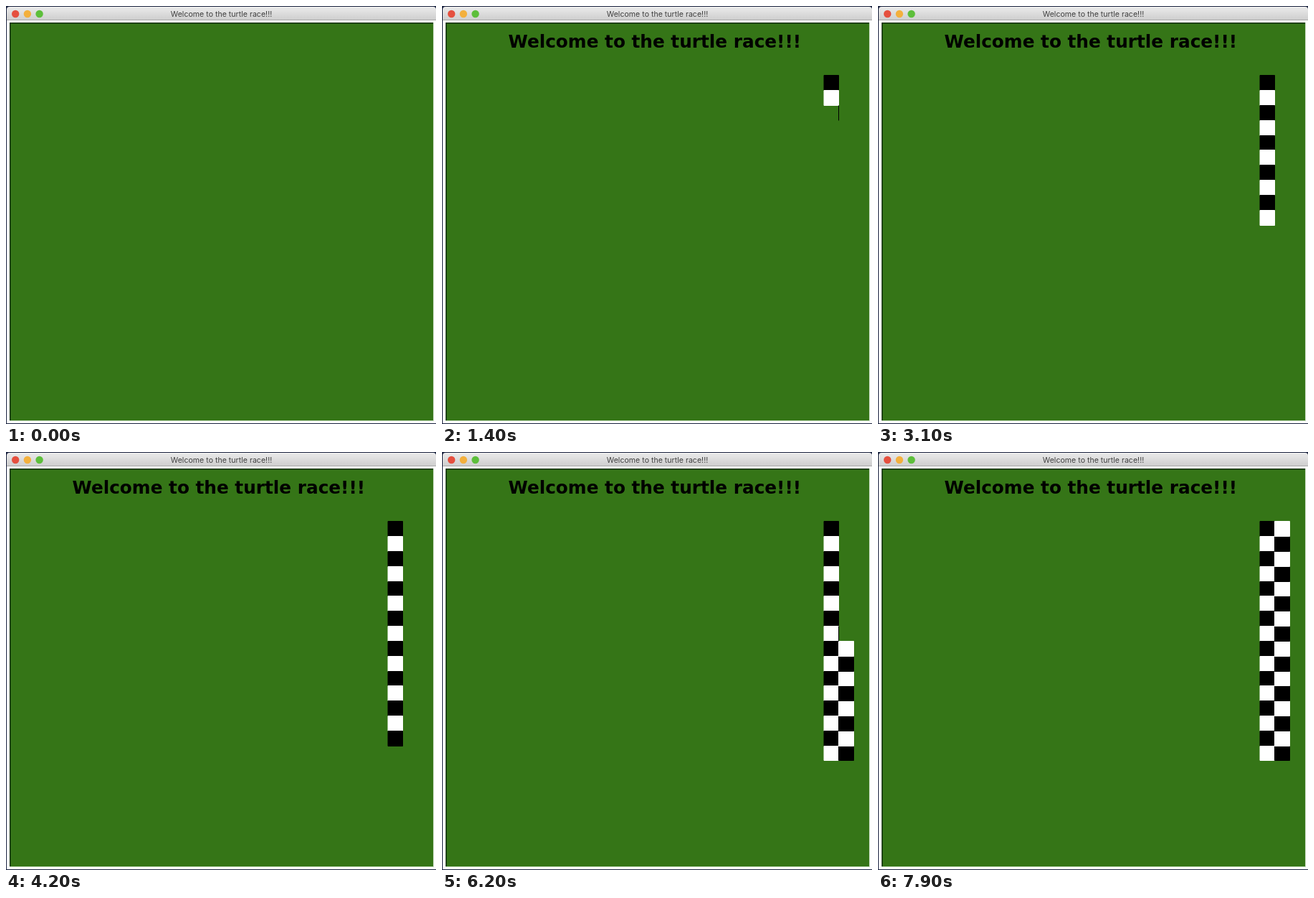
Animation of 600 by 582 pixels, one loop 8000 ms. Source, as an HTML page with a canvas:

```html
<!DOCTYPE html>
<html lang="en">
<head>
<meta charset="utf-8">
<title>Turtle race</title>
<style>
  html, body { margin: 0; width: 100%; height: 100%; overflow: hidden; }
  canvas { display: block; }
</style>
</head>
<body>
<canvas id="stage" width="600" height="582"></canvas>
<script>
const ctx = document.getElementById('stage').getContext('2d');
const LOOP = 8000;
const TITLE_AT = 400;
const FLAG_AT = 904;
const SQUARE_MS = 218.5;
const ROWS = 16;
const TITLE = 'Welcome to the turtle race!!!';
const columnX = [533, 553.5, 574.5];
const rowY = i => Math.floor(96.7 + 20.83 * i) + 0.5;

function box(color, x, y, w, h) {
  ctx.fillStyle = color;
  ctx.fillRect(x, y, w, h);
}

function text(font, color, align, x, y) {
  ctx.font = font;
  ctx.fillStyle = color;
  ctx.textAlign = align;
  ctx.fillText(TITLE, x, y);
}

function drawWindow() {
  box('#1b2440', 0, 0, 600, 582);
  const bar = ctx.createLinearGradient(0, 1, 0, 20);
  bar.addColorStop(0, '#ebebeb');
  bar.addColorStop(1, '#cdcdcd');
  ctx.fillStyle = bar;
  ctx.beginPath();
  ctx.roundRect(1, 1, 599, 30, [4, 4, 0, 0]);
  ctx.fill();
  box('#a9a9a9', 1, 19, 599, 1);
  box('#fff', 1, 20, 599, 561);
  ['#e5503f', '#f3b03d', '#5dbf3b'].forEach((color, i) => {
    ctx.fillStyle = color;
    ctx.beginPath();
    ctx.arc(13.2 + 16.7 * i, 11, 5.2, 0, 2 * Math.PI);
    ctx.fill();
  });
  text('10.6px Inter, sans-serif', '#404040', 'center', 300.5, 15);

  // Sunken border around the field
  box('#c3d9bb', 5, 23, 592, 555);
  box('#14300a', 5, 23, 591, 554);
  box('#357517', 6.5, 24.5, 589.5, 552.5);
}

// Column one runs downward, column two back up; each square turns clockwise.
function corners(n) {
  const down = n < ROWS;
  const row = down ? n : 2 * ROWS - 1 - n;
  const left = columnX[down ? 0 : 1], right = columnX[down ? 1 : 2];
  const top = rowY(row), bottom = rowY(row + 1);
  return down
    ? [[right, top], [right, bottom], [left, bottom], [left, top]]
    : [[left, bottom], [left, top], [right, top], [right, bottom]];
}

function drawSquare(n, sides, filled) {
  const points = corners(n);
  ctx.fillStyle = ctx.strokeStyle = n % 2 ? '#fff' : '#000';
  ctx.lineWidth = 1;
  ctx.beginPath();
  ctx.moveTo(...points[0]);
  for (let i = 1; i <= sides; i++) ctx.lineTo(...points[i % 4]);
  if (filled) ctx.fill();
  ctx.stroke();
}

function draw(t) {
  drawWindow();
  if (t >= TITLE_AT) {
    text('bold 24.75px "DejaVu Sans", sans-serif', '#000', 'left', 92.5, 58);
  }
  const progress = Math.min(Math.max((t - FLAG_AT) / SQUARE_MS, 0), 2 * ROWS);
  const done = Math.floor(progress);
  for (let n = 0; n < done; n++) drawSquare(n, 4, true);
  const sides = Math.floor((progress - done) * 5);
  if (sides) drawSquare(done, sides, false);
}

function frame() {
  draw(performance.now() % LOOP);
  requestAnimationFrame(frame);
}
frame();
</script>
</body>
</html>
```
